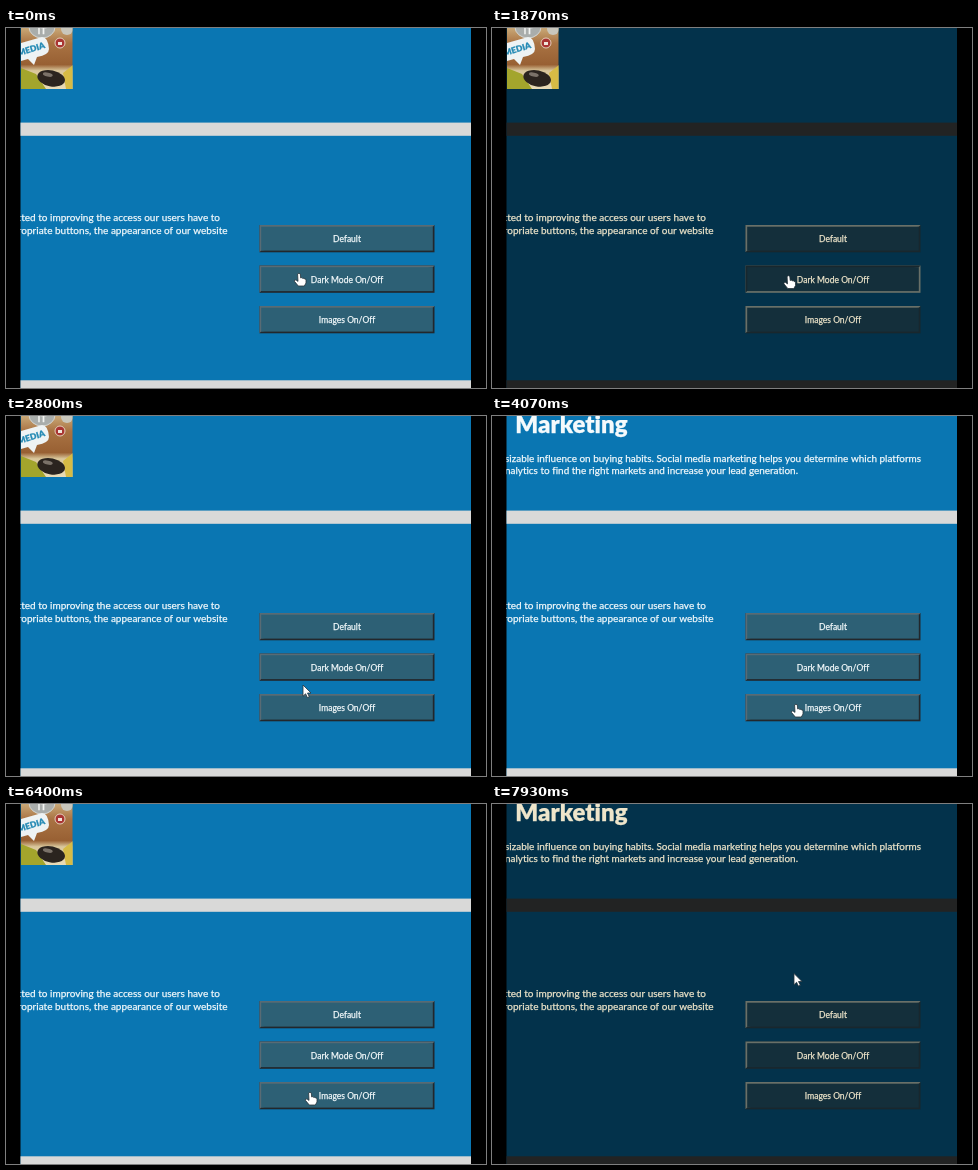
Write an HTML page with a canvas that moves like this. It is 480x360 px and loops after 8000 ms.

```html
<!DOCTYPE html>
<html lang="en">
<meta charset="utf-8">
<title>Accessibility buttons</title>
<style>
  html, body { margin: 0; height: 100%; overflow: hidden; background: #000; }
  canvas { display: block; }
</style>
<canvas width="480" height="360"></canvas>
<script>
const ctx = document.querySelector('canvas').getContext('2d');
ctx.letterSpacing = '0.01px'; // any spacing turns ligatures off
const LOOP = 8000;
const themes = {
  light: { page: '#0a76b2', band: '#d9d9d8', text: '#f4fafc', button: '#2d6075', lit: '#596b74', shade: '#22272c' },
  dark: { page: '#03324b', band: '#222323', text: '#eee5ca', button: '#142f3b', lit: '#697068', shade: '#19272d' }
};
const labels = ['Default', 'Dark Mode On/Off', 'Images On/Off'];

// [press, release, button]; the setting flips on release
const clicks = [
  [270, 400, 1], [1870, 2000, 1], [3530, 3660, 2],
  [5000, 5130, 2], [6530, 6600, 2], [7470, 7600, 1]
];

// [time, x, y] of the pointer's tip
const path = [
  [0, 293, 245], [70, 293, 245], [330, 296.5, 247.5], [2670, 296.5, 247.5],
  [2800, 297, 269], [3050, 304, 288], [7270, 304, 288],
  [7440, 306, 249], [7640, 306, 249], [7900, 302, 169.5], [LOOP, 302, 169.5]
];

const hand = new Path2D('M-1.4 1Q0-.6 1.3 1L1.7 5Q3 4 3.6 5.4Q5 4.7 5.5 6Q7 5.6 7 7.2V10L5.3 13H-.7L-4.6 8.3Q-4.7 6.4-3 6.9L-1 8.4Z');
const arrow = new Path2D('M0 0V11.2L2.6 8.8L4.4 12.6L6.3 11.7L4.5 8H8Z');

function rect(x, y, w, h, color) {
  ctx.fillStyle = color;
  ctx.fillRect(x, y, w, h);
}

function shape(path, fill, stroke) {
  ctx.fillStyle = fill;
  ctx.fill(path);
  if (stroke) {
    ctx.strokeStyle = stroke;
    ctx.stroke(path);
  }
}

function circle(x, y, rx, ry, fill, stroke) {
  const p = new Path2D();
  p.ellipse(x, y, rx, ry, 0, 0, 7);
  shape(p, fill, stroke);
}

function text(str, x, y, size, color, align = 'right', weight = 400) {
  ctx.font = `${weight} ${size}px Lato, sans-serif`;
  ctx.textAlign = align;
  ctx.fillStyle = ctx.strokeStyle = color;
  ctx.lineWidth = .25;
  ctx.fillText(str, x, y);
  ctx.strokeText(str, x, y);
}

function drawButton(i, theme, pressed) {
  const x = 253.5, y = 197 + i * 40.5, w = 175, h = 27.3, b = 1.7;
  const [top, bottom] = pressed ? [theme.shade, theme.lit] : [theme.lit, theme.shade];
  rect(x, y, w, h, bottom);
  shape(new Path2D(`M${x} ${y}h${w}l${-b} ${b}L${x + b} ${y + h - b}l${-b} ${b}Z`), top);
  rect(x + b, y + b, w - 2 * b, h - 2 * b, theme.button);
  text(labels[i], 341, y + 17, 8.5, theme.text, 'center');
}

function drawPicture() {
  ctx.save();
  ctx.beginPath();
  ctx.rect(15, 0, 51.5, 61);
  ctx.clip();
  const wood = ctx.createLinearGradient(0, 0, 0, 61);
  wood.addColorStop(0, '#c9a877');
  wood.addColorStop(.25, '#a97343');
  wood.addColorStop(.6, '#986033');
  wood.addColorStop(.7, '#d9c69b');
  wood.addColorStop(1, '#eadcb7');
  rect(15, 0, 52, 61, wood);
  shape(new Path2D('M15 40L30 46L40 61H15Z'), '#a3a52c');
  shape(new Path2D('M57 45L67 37V61H60Z'), '#d6bb45');
  ctx.lineWidth = 1;
  circle(36, -1, 13, 11, '#a9adab', '#d4d5d0');
  circle(61, 1, 6, 6, '#c9c7bc');
  circle(54, 15, 5, 5, '#a93432', '#e4d1bd');
  rect(52, 14, 4, 3, '#f0e6dc');
  shape(new Path2D('M15 15L36 9Q42 9 43 21Q43 27 31 29L28 37L22 31L15 33Z'), '#eef3f4');
  text('IT', 36, 6, 10, '#f3f4f1', 'center', 700);
  ctx.translate(26, 24);
  ctx.rotate(-.3);
  text('MEDIA', 0, 0, 8.5, '#268bb5', 'center', 900);
  ctx.rotate(.5);
  ctx.translate(24, 22);
  circle(0, 0, 14, 8, '#2b241f');
  circle(-4, -3, 5, 2, '#7b7269');
  ctx.restore();
}

function drawPointer(time) {
  const next = Math.max(1, path.findIndex(p => p[0] > time));
  const a = path[next - 1], b = path[next];
  let k = (time - a[0]) / (b[0] - a[0]);
  k = k * k * (3 - 2 * k);
  const x = a[1] + (b[1] - a[1]) * k, y = a[2] + (b[2] - a[2]) * k;
  const over = labels.some((_, i) => y >= 197 + i * 40.5 && y <= 224 + i * 40.5);
  ctx.save();
  ctx.translate(x, y);
  ctx.lineWidth = .8;
  ctx.lineJoin = 'round';
  shape(over ? hand : arrow, '#fff', '#26333a');
  ctx.restore();
}

function draw(time) {
  const toggled = button => clicks.filter(c => c[2] === button && time >= c[1]).length % 2;
  const theme = toggled(1) ? themes.dark : themes.light;
  const held = clicks.find(c => time >= c[0] && time < c[1]);

  rect(0, 0, 480, 360, '#000');
  ctx.save();
  ctx.beginPath();
  ctx.rect(14.5, 0, 450.5, 360);
  ctx.clip();
  rect(14, 0, 452, 360, theme.page);
  rect(14, 94.6, 452, 13.2, theme.band);
  rect(14, 352.3, 452, 8, theme.band);

  if (toggled(2)) {
    text('Marketing', 135.5, 17.3, 24, theme.text, 'right', 900);
    text('a sizable influence on buying habits. Social media marketing helps you determine which platforms', 429, 45.5, 9.95, theme.text);
    text('analytics to find the right markets and increase your lead generation.', 306, 58.2, 9.95, theme.text);
  } else {
    drawPicture();
  }
  text('committed to improving the access our users have to', 214, 193.3, 10, theme.text);
  text('appropriate buttons, the appearance of our website', 221.5, 206, 10, theme.text);
  labels.forEach((_, i) => drawButton(i, theme, held && held[2] === i));
  drawPointer(time);
  ctx.restore();
}

function tick() {
  draw(performance.now() % LOOP);
  requestAnimationFrame(tick);
}
tick();
</script>
</html>
```
